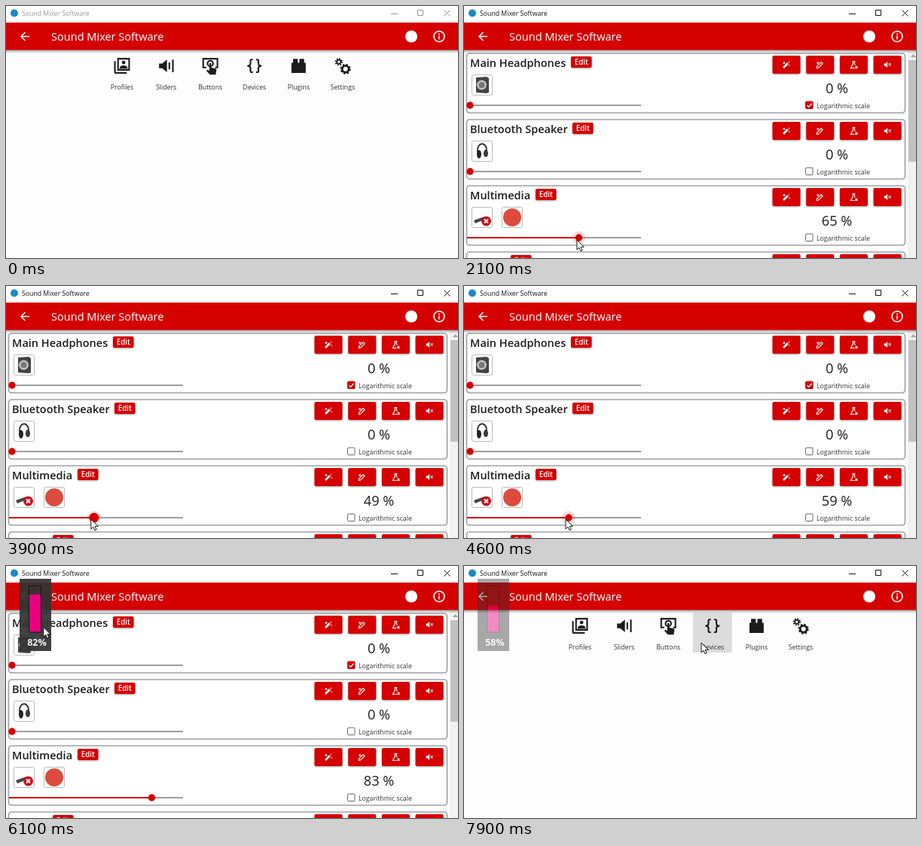
Write an HTML page that moves like this. It is 600x335 px and loops after 8 s.

```html
<!DOCTYPE html>
<html lang="en">
<head>
<meta charset="utf-8">
<title>Sound Mixer Software</title>
<style>
  html, body { margin: 0; width: 100%; height: 100%; overflow: hidden; background: #fdfdfd; }
  svg { display: block; width: 100vw; height: 100vh; }
  text { font-family: "Open Sans", "Noto Sans", sans-serif; fill: #1c1c1c; }
  .mid { text-anchor: middle; }
  .small { font-size: 8.75px; fill: #333; }
  .name { font-size: 14.5px; font-weight: 600; }
  .value { font-size: 18.2px; }
  .edit { font-size: 9.9px; font-weight: 600; fill: #fff; }
  .red { fill: #d50000; }
  .raised { filter: drop-shadow(0 1px 1px #0006); }
  .line { fill: none; stroke: currentColor; stroke-width: 2; }
</style>
</head>
<body>
<svg viewBox="0 0 600 335" preserveAspectRatio="none">
  <defs>
    <linearGradient id="shade" x2="0" y2="1">
      <stop stop-opacity=".38"/><stop offset="1" stop-opacity="0"/>
    </linearGradient>
  </defs>
  <rect width="600" height="335" fill="#fdfdfd"/>
  <g id="home"></g>
  <g id="mixer"></g>

  <rect width="600" height="22" fill="#fff"/>
  <circle cx="11" cy="9.5" r="5" fill="#1b8ac9"/>
  <text id="caption" x="21" y="13" font-size="8.73">Sound Mixer Software</text>
  <path id="controls" d="M511 10.5h9M546.5 5.5h7v7h-7zM581.5 5.500l8 8m0-8l-8 8" fill="none"/>

  <rect y="58" width="600" height="5" fill="url(#shade)"/>
  <rect class="red" y="22" width="600" height="36.500"/>
  <g fill="none" stroke="#fff" stroke-width="1.6">
    <path d="M31 40.500H20m5.500-5.500l-5.500 5.500 5.500 5.500"/>
    <circle cx="575" cy="40.500" r="7"/>
    <path d="M575 36.500v1.700m0 1.300v5"/>
  </g>
  <circle cx="538" cy="40.500" r="8" fill="#fff"/>
  <text x="60" y="46" font-size="14.55" style="fill:#fff">Sound Mixer Software</text>

  <g id="overlay">
    <rect x="18" y="17" width="42" height="96" fill="#333" fill-opacity=".93"/>
    <rect id="level" x="31" width="15" fill="#e6007e"/>
    <rect x="30.500" y="26.500" width="16" height="61.500" fill="none" stroke="#151515"/>
    <text id="percent" class="mid" x="41" y="106" font-size="12.5" font-weight="700" style="fill:#f2f2f2"></text>
  </g>

  <g id="pointer" stroke="#000" stroke-width=".9" fill="#fff" stroke-linejoin="round">
    <path id="arrow" d="M0 0v13l3-2.800 2 4.600 2.200-1-2-4.400h4.100z"/>
    <path id="hand" d="M-1.500 1q1.500-2 3 0v5l1-.7q1.200-.3 1.600.9 1.600-.7 2.200.6 1.700-.4 2 1.200v4.500l-1.600 4.500h-6.700l-4.500-6.500q.5-2 3 0z"/>
  </g>
</svg>
<script>
const $ = id => document.getElementById(id);
const set = (id, attrs) => {
  for (const key in attrs) $(id).setAttribute(key, attrs[key]);
};
const show = (id, on) => set(id, { visibility: on ? 'visible' : 'hidden' });

// Home tiles: label and icon on a 24 unit grid
const tiles = [
  ['Profiles', `<path class="line" d="M3 6v13.500q0 1.500 1.500 1.500H18M7 3h14v14H7z"/>
    <circle cx="14" cy="7.700" r="2.300"/><path d="M9 15.500q0-4 5-4t5 4z"/>`],
  ['Sliders', '<path d="M3 9v6h4l6 5V4L7 9zM15 7.500h2v9h-2zM19.500 4h2v16h-2z"/>'],
  ['Buttons', `<path class="line" d="M7 14H3V3h18v11h-3"/><circle class="line" cx="12" cy="9" r="3.500" stroke-width="1.300"/>
    <path d="M10.800 9q1.200-2 2.400 0v5l5.500 1.500q1.300.4 1 2l-.9 5.500h-7.300l-4.500-5 1-1 2.800 1z"/>`],
  ['Devices', `<path class="line" d="M10 4H8Q7 4 7 5V9Q7 12 3 12Q7 12 7 15V19Q7 20 8 20H10
    M14 4h2q1 0 1 1V9q0 3 4 3q-4 0-4 3v4q0 1-1 1h-2"/>`],
  ['Plugins', '<path d="M3 8h2V4q0-1 1-1h4q1 0 1 1v4h2V4q0-1 1-1h4q1 0 1 1v4h2v13H3z"/>'],
  ['Settings', cog(7, 7, 3) + cog(15.500, 16, 4.700)]
];

function cog(x, y, r) {
  const tooth = 2 * Math.PI * (r + 1) / 16;
  return `<circle class="line" cx="${x}" cy="${y}" r="${r - .5}" style="stroke-width:${r * .55}"/>
    <circle class="line" cx="${x}" cy="${y}" r="${r + 1}" stroke-dasharray="${tooth}"/>`;
}

const tileX = i => 154 + 58.6 * i;

$('home').innerHTML = tiles.map(([label, icon], i) => `
  <rect id="tile${i}" x="${tileX(i) - 26}" y="62" width="52" height="53" fill="#dcdcdc"/>
  <g transform="translate(${tileX(i) - 12.600} 67) scale(1.05)" color="#1c1c1c" fill="#1c1c1c">${icon}</g>
  <text class="small mid" x="${tileX(i)}" y="111">${label}</text>`).join('');

// Mixer cards, each drawn at the place of the first one
const box = (x, art) => `<rect x="${x}.5" y="91.500" width="27" height="27" rx="2" fill="#fff" stroke="#bbb"/>${art}`;
const speaker = `<path d="M16 95l14-1 3 2v19l-3 1-14-1z" fill="#444"/>
  <circle cx="23.500" cy="105" r="6.500" fill="#c4c4c4"/><circle cx="23.500" cy="105" r="4" fill="#777"/>`;
const headphones = `<path d="M18 106c-1-14 12-14 12-2" fill="none" stroke="#333" stroke-width="2"/>
  <ellipse cx="20" cy="109" rx="3" ry="5.500" fill="#222"/><ellipse cx="29" cy="108" rx="3" ry="5" fill="#3a3a3a"/>`;
const missing = `<path d="M13 109l14-5 2 3-14 6z" fill="#444"/><circle cx="29.500" cy="110" r="6.500" fill="#c8101e"/>
  <path d="M27 107.500l5 5m0-5l-5 5" stroke="#fff" stroke-width="1.800"/>`;
const cards = [
  ['Main Headphones', 142, box(10, speaker)],
  ['Bluetooth Speaker', 144, box(10, headphones)],
  ['Multimedia', 95, box(10, missing) + box(50, '<circle cx="64" cy="105" r="12" fill="#dd4b3e"/>')],
  ['Games', 62, '']
];
const actions = [
  '<path d="M-4 4L2-2" stroke-width="2.600"/><path d="M3-3l1-1M-3-4v3m-1.500-1.500h3M4 0v2"/>',
  '<path d="M-4.500 4.500l.5-2.500 5.500-5.500 2 2-5.500 5.500zM-3-4v3m-1.500-1.500h3"/>',
  '<path d="M-2-4.500h4M-1-4v3l-3 5.500h5M1-4v3l1 1.500M2 2l3 3m0-3l-3 3"/>',
  '<path d="M-4.500-1.500v3h2l2.500 2.500v-8l-2.500 2.500z" fill="#fff" stroke="none"/><path d="M1.500-1.500l3 3m0-3l-3 3"/>'
];

const card = ([name, editX, icons], i) => `<g transform="translate(0 ${88 * i})">
  <rect x="3.500" y="63" width="582" height="79" rx="4" fill="#fff" stroke="#a2a2a6" stroke-width="1.700"/>
  <text class="name" x="8" y="81">${name}</text>
  <rect class="red raised" x="${editX}" y="67" width="27.500" height="15" rx="2"/>
  <text class="edit mid" x="${editX + 13.800}" y="78">Edit</text>
  ${icons}
  <path d="M4 132h231" stroke="#7d7d7d" stroke-width="1.600"/>
  ${i == 2 ? `<path id="fill" stroke="#d50000" stroke-width="1.800"/>
    <circle id="halo" class="red" cy="132" r="9" opacity=".14"/>` : ''}
  <circle ${i == 2 ? 'id="thumb"' : ''} class="red" cx="8" cy="132" r="4.700"/>
  ${actions.map((icon, k) => `<rect class="red raised" x="${409.500 + 44.700 * k}" y="66" width="37" height="24" rx="2"/>
    <g transform="translate(${428 + 44.700 * k} 78)" fill="none" stroke="#fff" stroke-width="1.100">${icon}</g>`).join('')}
  <text ${i == 2 ? 'id="value"' : ''} class="value mid" x="495" y="116">0 %</text>
  <rect x="453.500" y="127" width="9.500" height="9.500" rx="1" fill="${i ? '#fff' : '#d50000'}" stroke="${i ? '#666' : '#d50000'}"/>
  ${i ? '' : '<path d="M455.500 132l2 2.200 4-4.500" fill="none" stroke="#fff" stroke-width="1.400"/>'}
  <text class="small" x="468" y="135.500">Logarithmic scale</text>
</g>`;

$('mixer').innerHTML = cards.map(card).join('') + `
  <rect x="589" y="58" width="11" height="277" fill="#f1f1f1"/>
  <rect x="590" y="72" width="10" height="135" fill="#c1c1c1"/>
  <path d="M593 68l3.500-4 3.500 4z" fill="#a3a3a3"/>`;

// Keys are [time, value, ...]; motion eases between neighbours
function tween(keys, t) {
  const next = keys.findIndex(key => key[0] > t);
  if (next < 0) return keys[keys.length - 1].slice(1);
  if (!next) return keys[0].slice(1);
  const a = keys[next - 1], b = keys[next];
  const p = (t - a[0]) / (b[0] - a[0]), ease = p * p * (3 - 2 * p);
  return a.slice(1).map((v, i) => v + (b[i + 1] - v) * ease);
}

const pointerKeys = [
  [0, 300, 350], [700, 235, 140], [1000, 213, 101], [1400, 213, 101],
  [2000, 150, 311], [4500, 135, 310], [5500, 135, 310], [6300, 34, 39],
  [6900, 34, 37], [7300, 34, 37], [7900, 315, 102]
];
const volumeKeys = [
  [2200, 65], [2700, 88], [3300, 32], [3900, 49], [4500, 59],
  [4700, 59], [5300, 97], [5500, 100], [6900, 58]
];
const volumeAt = t => tween(volumeKeys, t)[0];

function draw(t) {
  const mixing = t >= 1500 && t < 7300;
  const dragging = t >= 2200 && t < 4500;
  const volume = volumeAt(t), thumbX = 8 + 2.222 * volume;
  let [x, y] = tween(pointerKeys, t);
  if (dragging) x = thumbX - 4;

  show('home', !mixing);
  show('mixer', mixing);
  tiles.forEach((_, i) => set('tile' + i, {
    opacity: +(Math.abs(x - tileX(i)) < 26 && y > 62 && y < 115)
  }));

  set('fill', { d: `M4 132H${thumbX}` });
  set('thumb', { cx: thumbX, r: dragging ? 6.5 : 4.7 });
  set('halo', { cx: thumbX, opacity: Math.hypot(x - thumbX, y - 308) < 9 ? .14 : 0 });
  $('value').textContent = Math.round(volume) + ' %';

  const shown = Math.ceil(volumeAt(t + 50)), height = shown * .61;
  set('overlay', { opacity: t < 4700 ? 0 : Math.min(1, 1 - (t - 7500) / 400 * .55) });
  set('level', { y: 88 - height, height });
  $('percent').textContent = shown + '%';

  const ink = t < 600 ? '#999' : '#111';
  $('caption').style.fill = ink;
  set('controls', { stroke: ink });

  const overBack = mixing && Math.hypot(x - 25, y - 40) < 18;
  set('pointer', { transform: `translate(${x} ${y})`, opacity: t < 100 ? 0 : 1 });
  set('arrow', { opacity: +!overBack });
  set('hand', { opacity: +overBack });
}

const start = performance.now();
function tick() {
  const t = (performance.now() - start) % 8000;
  draw(Math.floor(t / 100) * 100);
  requestAnimationFrame(tick);
}
tick();
</script>
</body>
</html>
```
